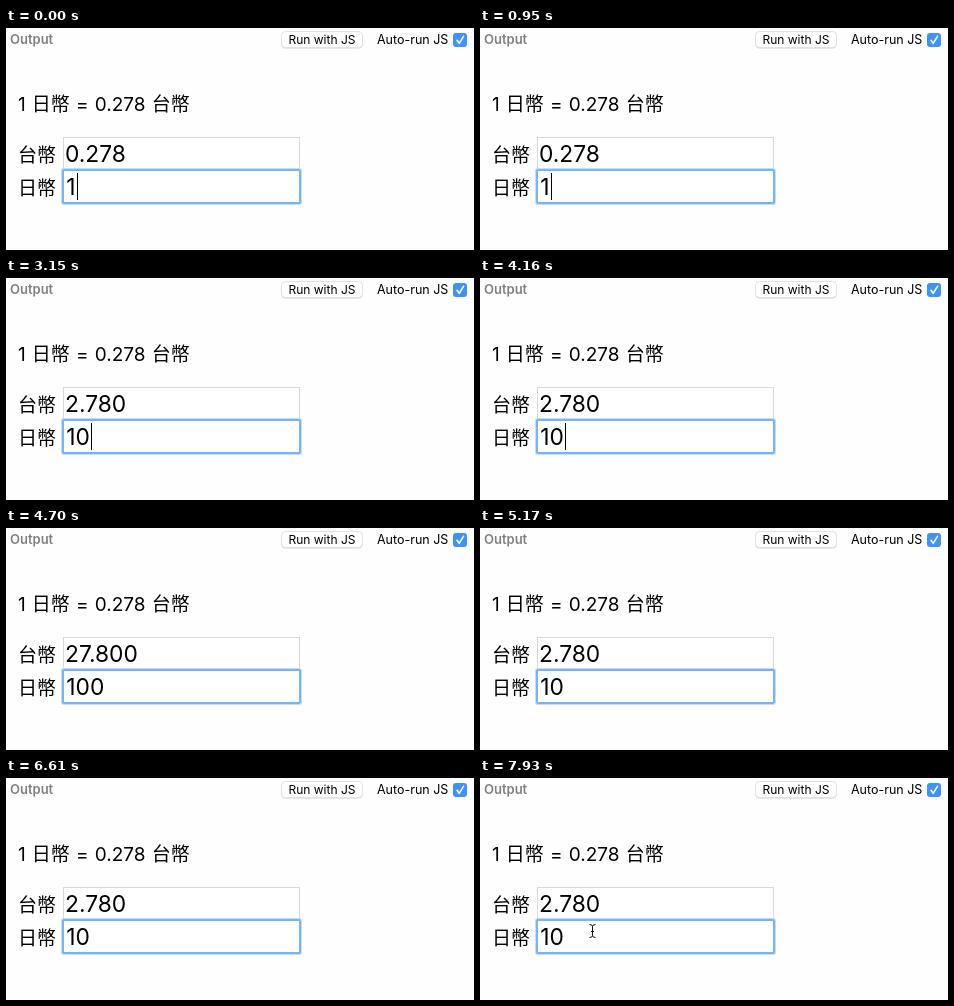
An HTML page that plays this animation: 468x222 px, repeating every 7990 ms.

```html
<!DOCTYPE html>
<html lang="zh-Hant">
<head>
<meta charset="utf-8">
<style>
html, body { margin: 0; width: 100%; height: 100%; overflow: hidden; background: #fefefe; }
svg { display: block; }
text { font-family: Inter, "Noto Sans CJK TC", "Noto Sans CJK", sans-serif; white-space: pre; }
.ui { font-size: 12.5px; }
.page { font-size: 19px; word-spacing: .8px; }
.field { font-size: 22.8px; }
.title { font-size: 13px; font-weight: 600; fill: #808080; }
</style>
</head>
<body>
<svg width="468" height="222" viewBox="0 0 468 222">
  <text class="title" x="4" y="16">Output</text>
  <rect x="275.5" y="4" width="81" height="16.5" rx="4" fill="#d2d2d2"/>
  <rect x="275.5" y="3.5" width="81" height="16" rx="4" fill="#fff" stroke="#e2e2e2"/>
  <text class="ui" x="282.5" y="16" style="font-size: 12px">Run with JS</text>
  <text class="ui" x="371" y="16">Auto-run JS</text>
  <rect x="447" y="5" width="14" height="14" rx="3" fill="#3f93f7"/>
  <path d="M451 12.3l2.2 3 4.3-7" fill="none" stroke="#fff" stroke-width="1.6" stroke-linecap="round" stroke-linejoin="round"/>

  <text class="page" x="12" y="83">1 日幣 = 0.278 台幣</text>
  <text class="page" x="12" y="134">台幣</text>
  <text class="page" x="12" y="167">日幣</text>

  <rect x="57.5" y="109.5" width="236" height="32" fill="#fff" stroke="#d9d9d9"/>
  <rect x="57" y="142" width="237" height="33" rx="1" fill="none" stroke="#c3defa" stroke-width="4"/>
  <rect x="57" y="142" width="237" height="33" rx="1" fill="#fff" stroke="#78b4f4" stroke-width="2"/>
  <text class="field" id="twd" x="59" y="134"></text>
  <text class="field" id="jpy" x="60.3" y="167"></text>
  <rect id="caret" y="145" width="1" height="27"/>
  <path id="pointer" d="M109.5 146.5q3 0 3 2v9q0 2-3 2M115.5 146.5q-3 0-3 2v9q0 2 3 2M111 153.5h3" fill="none" stroke="#111"/>
</svg>
<script>
const LOOP = 7990, RATE = 0.278;
const $ = id => document.getElementById(id);
const caretX = { 1: 71, 10: 85, 100: 99 };
// [time, amount]
const edits = [[0, 1], [3150, 10], [4220, 100], [5170, 10], [6070, 100], [6610, 10]];
// Caret starts visible and flips at each of these times
const blinks = [410, 950, 1420, 1900, 2440, 2910, 3620, 4160, 4700, 5710, 6550, 7090, 7570];

function draw(t) {
  const amount = edits.filter(e => e[0] <= t).pop()[1];
  const caretOn = blinks.filter(b => b <= t).length % 2 === 0;
  $('jpy').textContent = amount;
  $('twd').textContent = (amount * RATE).toFixed(3);
  $('caret').setAttribute('x', caretX[amount]);
  $('caret').style.display = caretOn ? '' : 'none';
  $('pointer').style.display = t >= 7930 ? '' : 'none';
}

const start = performance.now();
function tick() {
  draw((performance.now() - start) % LOOP);
  requestAnimationFrame(tick);
}
tick();
</script>
</body>
</html>
```
